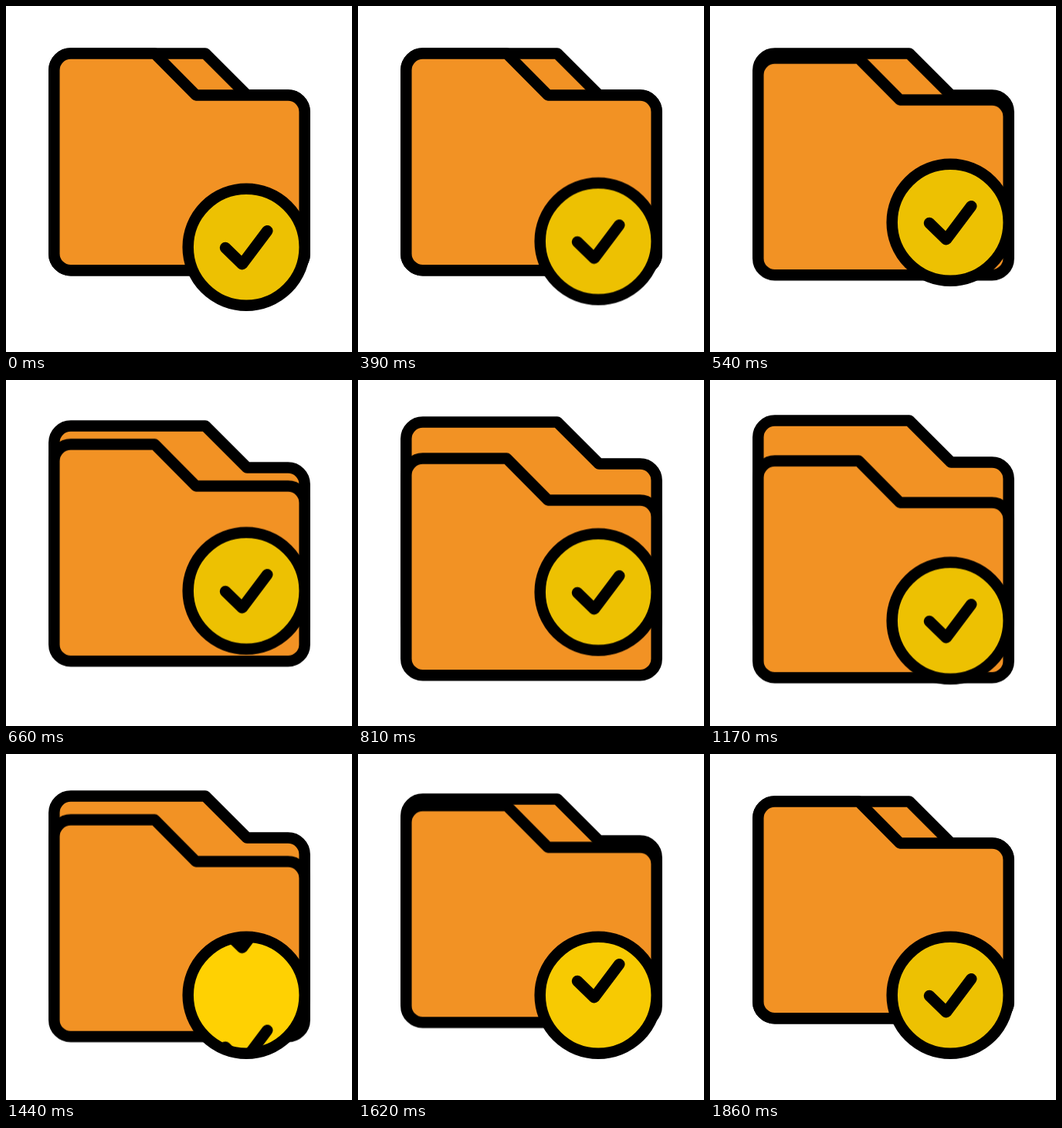
Write an HTML page that moves like this. It is 448x448 px and loops after 2250 ms.

```html
<!DOCTYPE html>
<html lang="en">
<head>
<meta charset="utf-8">
<title>Folder with check badge</title>
<style>
  html, body { margin: 0; width: 100%; height: 100%; overflow: hidden; background: #fff; }
  svg { display: block; width: 100vw; height: 100vh; }

  .line { stroke: #000; stroke-width: 14.5; stroke-linecap: round; stroke-linejoin: round; }
  .folder { fill: #f29224; }
  .tick { fill: none; }

  .back, .front, .badge, .disc, .ticks {
    animation: 2250ms cubic-bezier(.333, 0, .667, 1) infinite;
  }
  .back { animation-name: back; }
  .front { animation-name: front; }
  .badge { animation-name: hop; }
  .disc { fill: #edc102; animation-name: glow; }
  .ticks { animation-name: roll; }

  @keyframes back {
    0%, 24% { transform: none; }
    41.33%, 56% { transform: translateY(-9px); }
    82.67%, 100% { transform: none; }
  }
  @keyframes front {
    0%, 19.33% { transform: none; }
    39.33%, 52% { transform: translateY(43.2px); }
    77.7%, 100% { transform: none; }
  }
  @keyframes hop {
    0% { transform: none; }
    8% { transform: none; animation-timing-function: cubic-bezier(.68, 0, .4, 1); }
    32.4% { transform: translateY(-40px); animation-timing-function: cubic-bezier(.42, 0, .45, 1); }
    54.67%, 100% { transform: none; }
  }
  /* One tick leaves below while its twin, 150px higher, takes its place. */
  @keyframes roll {
    0%, 52.3% { transform: none; }
    77.7%, 100% { transform: translateY(150px); }
  }
  @keyframes glow {
    0%, 52.3% { fill: #edc102; }
    63%, 67% { fill: #ffd102; }
    77.7%, 100% { fill: #edc102; }
  }
</style>
</head>
<body>
<svg viewBox="0 0 448 448">
  <defs>
    <clipPath id="round"><circle cx="311.2" cy="312.3" r="76"/></clipPath>
    <path id="tick" d="M284 313 305.8 334.3 338.3 291.2"/>
  </defs>

  <path class="line folder back" d="M83.9 61.5H258L312 115.5H365.1a21.6 21.6 0 0 1 21.6 21.6V320.7a21.6 21.6 0 0 1-21.6 21.6H83.9a21.6 21.6 0 0 1-21.6-21.6V83.1a21.6 21.6 0 0 1 21.6-21.6Z"/>
  <path class="line folder front" d="M83.9 61.5H192.5L246 115.5H365.1a21.6 21.6 0 0 1 21.6 21.6V320.7a21.6 21.6 0 0 1-21.6 21.6H83.9a21.6 21.6 0 0 1-21.6-21.6V83.1a21.6 21.6 0 0 1 21.6-21.6Z"/>

  <g class="badge">
    <circle class="line disc" cx="311.2" cy="312.3" r="75.5"/>
    <g clip-path="url(#round)">
      <g class="line tick ticks">
        <use href="#tick"/>
        <use href="#tick" y="-150"/>
      </g>
    </g>
  </g>
</svg>
</body>
</html>
```
